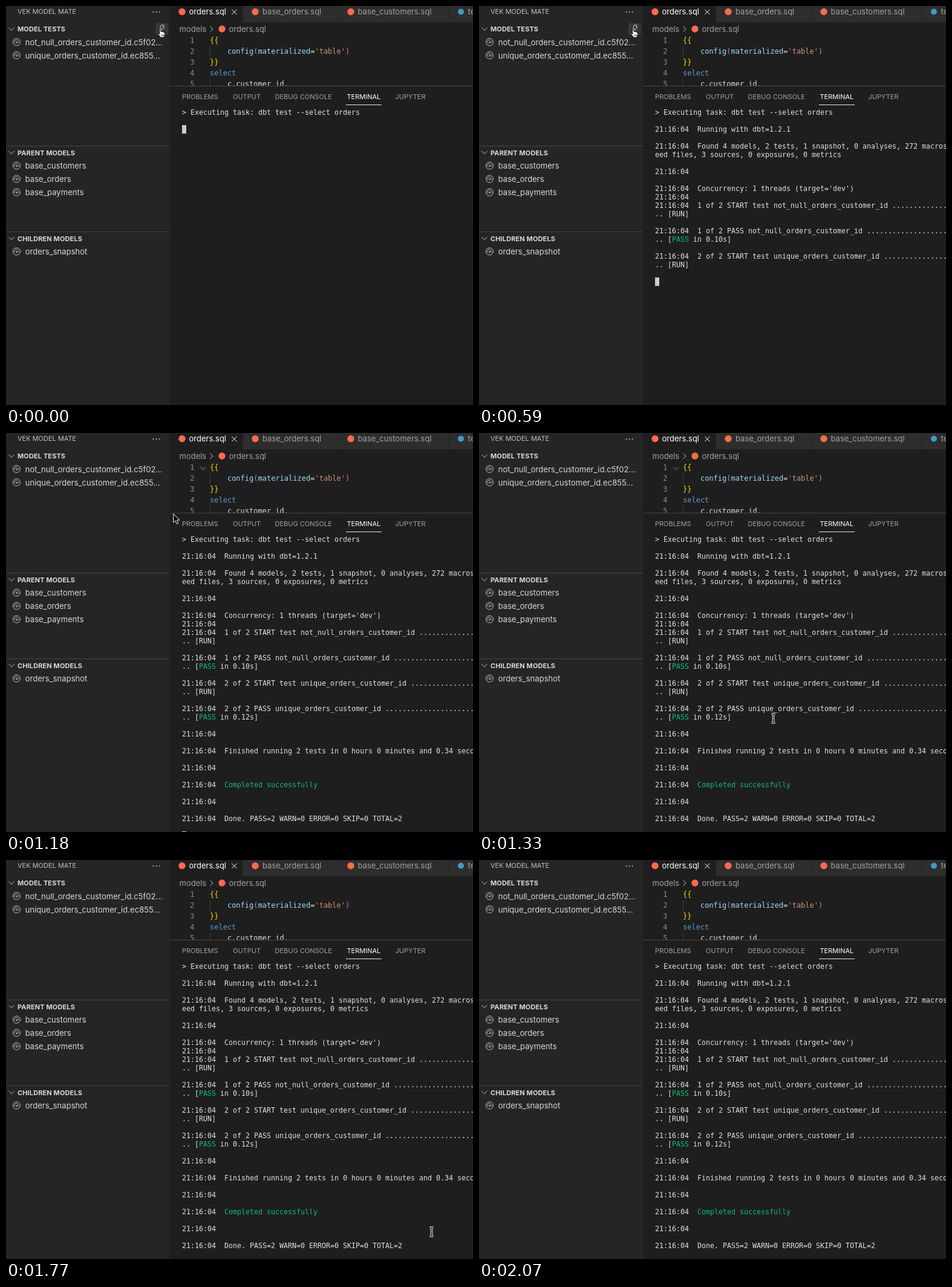
Recreate the animation shown at these times as an HTML page. Size 772 by 660 pixels, loop 2370 ms.

```html
<!DOCTYPE html>
<html lang="en">
<head>
<meta charset="utf-8">
<style>
  html, body { margin: 0; width: 100%; height: 100%; overflow: hidden; background: #1e1e1e; }
  svg { display: block; }
  text { white-space: pre; font: 13px Inter, "Open Sans", sans-serif; fill: #d8d8d8; }
  .item { letter-spacing: .04px; }
  .head { font-size: 11px; font-weight: 700; letter-spacing: .12px; }
  .small { font-size: 11px; fill: #a2a2a2; }
  .title { font-size: 11px; fill: #c0c0c0; }
  .code { font: 12px "DejaVu Sans Mono", monospace; fill: #dcdcdc; }
  .term { font: 11.63px "DejaVu Sans Mono", monospace; fill: #e0e0e0; }
  .num { fill: #8c8c8c; text-anchor: end; }
  .dim { fill: #a2a2a2; }
  .on { fill: #fff; }
  .line { fill: none; stroke: #c5c5c5; }
</style>
</head>
<body>
<svg width="772" height="660" viewBox="0 0 772 660">
  <defs>
    <clipPath id="editorClip"><rect x="271" y="0" width="501" height="132"/></clipPath>
    <g id="gauge" class="line">
      <circle r="6"/>
      <path d="M-3.2 1.6A3.5 3.5 0 0 1 1.2-3.3M3.4-.8A3.5 3.5 0 0 1 3.1 1.6M-.2 1L2.8-2.4"/>
      <circle cy="1" r=".9"/>
    </g>
    <path id="fold" class="line" d="M-4.5-2.3L0 2.3 4.5-2.3"/>
    <path id="beam" d="M-3-7.3Q0-7.3 0-5Q0-7.3 3-7.3M0-5V5M-3 7.3Q0 7.3 0 5Q0 7.3 3 7.3M-2 3H2"/>
  </defs>

  <rect width="772" height="660" fill="#1e1e1e"/>
  <g id="sidebar"><rect width="271" height="660" fill="#252526"/></g>
  <g id="tabs"><rect x="271" width="501" height="27" fill="#252526"/></g>
  <g id="editor" clip-path="url(#editorClip)"></g>
  <g id="panel"><rect x="271" y="132" width="501" height="1" fill="#444"/></g>
  <g id="terminal"></g>
  <rect id="block" x="291" width="7" height="14" fill="#ccc"/>
  <use id="codeFold" href="#fold" x="326" y="58.5"/>

  <g id="hover">
    <rect x="247" y="28" width="21" height="20" rx="4" fill="#373738"/>
    <path class="line" d="M256.5 31.5H261L259.2 35H262L255.5 42 257 37.5H254.5Z"/>
    <g transform="translate(-.5 -.8)" stroke="#000">
      <path fill="#fff" stroke-width=".9" d="M253.6 39.2q1.4-.9 2 .6l.9 3.4q2-.8 2.7.4q1.6-.4 2 .6q1.8-.1 1.8 1.6v2.2q0 1.5-1 3v1.7h-6.3q-.7-2-3-4.3q-1.4-1.8-.2-2.2q1-.2 2.2 1.2z"/>
      <path stroke-width=".8" d="M257.5 48v2.6M259.4 48v2.6M261.2 48v2.6"/>
    </g>
  </g>
  <path id="arrow" transform="translate(276.5 133)" fill="#000" stroke="#fff" d="M.3.8V15L3.6 12 5.8 17.2 8.3 16.2 6.1 11H10.6Z"/>
  <g id="ibeam" fill="none">
    <use href="#beam" stroke="#fff" stroke-width="3.2"/>
    <use href="#beam" stroke="#000" stroke-width="1.2"/>
  </g>
</svg>

<script>
const LOOP = 2370;
const $ = id => document.getElementById(id);
const add = (id, markup) => $(id).insertAdjacentHTML('beforeend', markup);
// Baselines snap to whole pixels so the text stays crisp
const text = (x, y, str, cls = '') => `<text x="${x}" y="${Math.round(y)}" class="${cls}">${str}</text>`;
const rect = (x, y, w, h, fill) => `<rect x="${x}" y="${y}" width="${w}" height="${h}" fill="${fill}"/>`;
const dot = (x, y, fill = '#ff694b', r = 5.7) => `<circle cx="${x}" cy="${y}" r="${r}" fill="${fill}"/>`;
const span = (fill, str) => `<tspan fill="${fill}">${str}</tspan>`;

// Sidebar
add('sidebar', text(19, 13, 'VEK MODEL MATE', 'title') +
  [243.5, 248.5, 253.5].map(x => dot(x, 10, '#c5c5c5', 1)).join(''));
const sections = [
  [38, 'MODEL TESTS', 'not_null_orders_customer_id.c5f02...', 'unique_orders_customer_id.ec855...'],
  [242.5, 'PARENT MODELS', 'base_customers', 'base_orders', 'base_payments'],
  [384.5, 'CHILDREN MODELS', 'orders_snapshot'],
];
sections.forEach(([y, title, ...items], i) => {
  if (i) add('sidebar', rect(0, Math.floor(y) - 11, 271, 1, '#444'));
  add('sidebar', `<use href="#fold" x="9" y="${y}"/>` + text(19, y + 4, title, 'head'));
  items.forEach((item, k) => {
    const row = y + 22 * (k + 1);
    add('sidebar', `<use href="#gauge" x="17.5" y="${row - .5}"/>` + text(31.7, row + 4.7, item, 'item'));
  });
});

// Tabs and breadcrumb
add('tabs',
  rect(271, 0, 120, 27, '#1e1e1e') + rect(392, 0, 157, 27, '#2d2d2d') +
  rect(550, 0, 181, 27, '#2d2d2d') + rect(732, 0, 40, 27, '#2d2d2d') +
  dot(291, 9.5) + text(302.5, 14, 'orders.sql', 'on') +
  '<path class="line" style="stroke:#fff" d="M373.3 5.8l8.2 8.2M381.5 5.8l-8.2 8.2"/>' +
  dot(412, 9.5) + text(424, 14, 'base_orders.sql', 'dim') +
  dot(570, 9.5) + text(581.5, 14, 'base_customers.sql', 'dim') +
  dot(752, 9.5, '#3c9cc9', 5) + text(763.5, 14, 'test.py', 'dim') +
  text(286.5, 43, 'models', 'dim') +
  '<path class="line" d="M337.5 33.7l4.5 4.5-4.5 4.5"/>' +
  dot(357, 38) + text(368.5, 43, 'orders.sql', 'dim'));

// Code
const code = [
  span('#ffd700', '{{'),
  '    ' + span('#9cdcfe', 'config') + span('#da70d6', '(') + span('#9cdcfe', 'materialized') + '=' +
    span('#ce9178', "'table'") + span('#da70d6', ')'),
  span('#ffd700', '}}'),
  span('#569cd6', 'select'),
  '    c.customer_id,',
];
code.forEach((line, i) => {
  const y = 61 + 18 * i;
  if (line.startsWith(' ')) add('editor', rect(337, y - 12, 1, 18, '#404040'));
  add('editor', text(311.5, y, i + 1, 'code num') + text(337, y, line, 'code'));
});

// Panel header
[[291, 'PROBLEMS'], [375, 'OUTPUT'], [444.5, 'DEBUG CONSOLE'], [563.5, 'TERMINAL'], [643.5, 'JUPYTER']]
  .forEach(([x, name]) => add('panel', text(x, 154, name, name === 'TERMINAL' ? 'small on' : 'small')));
add('panel', rect(562, 163, 59, 1, '#e7e7e7'));

// Terminal: "@" is the timestamp, braces mark green text
const dots = '.'.repeat(24);
const output = `> Executing task: dbt test --select orders

@  Running with dbt=1.2.1

@  Found 4 models, 2 tests, 1 snapshot, 0 analyses, 272 macros
eed files, 3 sources, 0 exposures, 0 metrics

@

@  Concurrency: 1 threads (target='dev')
@
@  1 of 2 START test not_null_orders_customer_id ${dots}
.. [RUN]

@  1 of 2 PASS not_null_orders_customer_id ${dots}
.. [{PASS} in 0.10s]

@  2 of 2 START test unique_orders_customer_id ${dots}
.. [RUN]

@  2 of 2 PASS unique_orders_customer_id ${dots}
.. [{PASS} in 0.12s]

@

@  Finished running 2 tests in 0 hours 0 minutes and 0.34 seconds

@

@  {Completed successfully}

@

@  Done. PASS=2 WARN=0 ERROR=0 SKIP=0 TOTAL=2`;
output.split('\n').forEach((line, i) => {
  const str = line.replace('@', '21:16:04').replace(/{(.*?)}/, (_, s) => span('#0dbc79', s));
  add('terminal', text(291, 180 + 14 * i, str, 'term'));
});
const rows = [...$('terminal').children];

// Each track holds [start time, value] steps
const cursorRow = [[0, 2], [450, 9], [590, 20], [740, 35]];
const foldAlpha = [[0, 0], [1180, .85], [1330, .6], [1470, .3], [1620, 0]];
const beamPos = [[0, null], [1330, [486.5, 472]], [1620, [653.5, 581]], [1770, [703.5, 615]],
  [1920, [723.5, 661]], [2070, null]];
const at = (track, t) => track.findLast(([start]) => t >= start)[1];
const show = (el, on) => el.setAttribute('visibility', on ? 'visible' : 'hidden');

function draw(now) {
  const t = now % LOOP;
  const row = at(cursorRow, t), beam = at(beamPos, t);
  rows.forEach((el, i) => show(el, i < row));
  $('block').setAttribute('y', 169 + 14 * row);
  show($('block'), t < 1330);
  show($('hover'), t < 1180);
  show($('arrow'), t >= 1180 && t < 1330);
  $('codeFold').setAttribute('opacity', at(foldAlpha, t));
  show($('ibeam'), beam);
  if (beam) $('ibeam').setAttribute('transform', `translate(${beam})`);
}

const start = performance.now();
function frame() {
  draw(performance.now() - start);
  requestAnimationFrame(frame);
}
frame();
</script>
</body>
</html>
```
